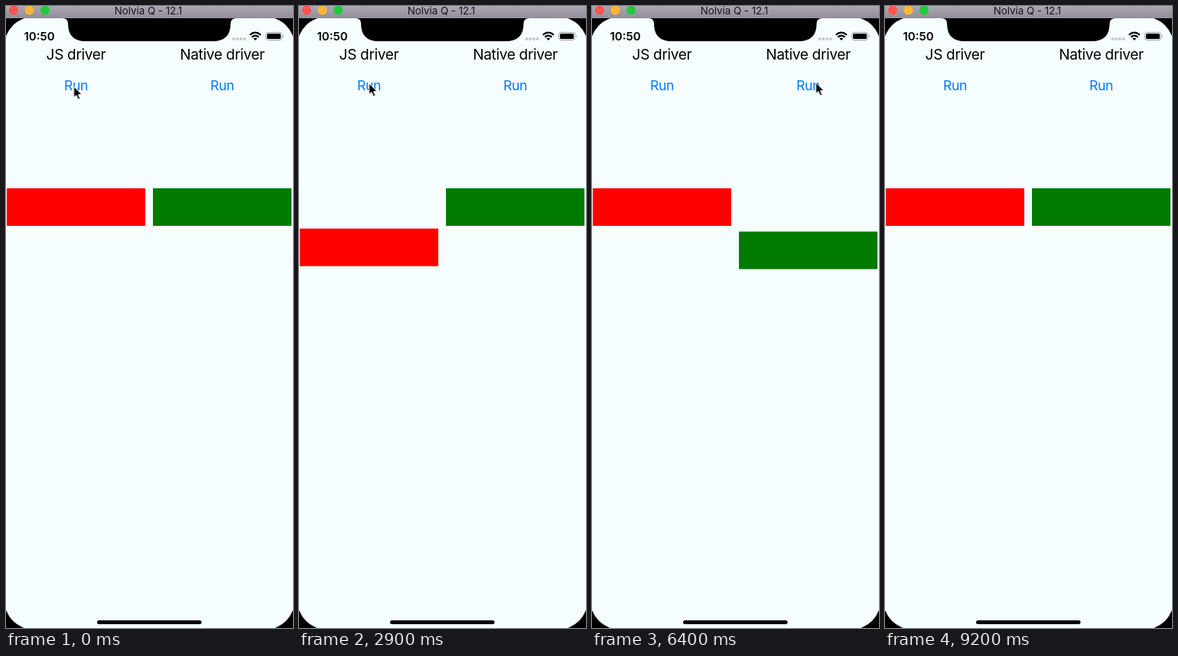
An HTML page without scripts that plays this animation: 375 px wide and 812 px high, repeating every 9.3 s.

```html
<!DOCTYPE html>
<html lang="en">
<head>
<meta charset="utf-8">
<title>Driver comparison</title>
<style>
  html, body { margin: 0; width: 100%; height: 100%; overflow: hidden; background: #000; }
  svg { display: block; width: 375px; height: 812px; }
  text { font-family: Inter, "Liberation Sans", sans-serif; text-anchor: middle; }
  .title { font-size: 13.3px; fill: #161616; }
  .clock { font-size: 15px; font-weight: 600; }
  .label { font-size: 19px; letter-spacing: -.3px; }
  .run { font-size: 17.6px; letter-spacing: -.3px; fill: #007aff; }

  /* "back" easing: t * t * (2.7 * t - 1.7) */
  .box { animation: 9.3s cubic-bezier(.3333, 0, .6667, -.5672) infinite; }
  .js { animation-name: js; }
  .native { animation-name: native; }
  .cursor { animation: cursor 9.3s ease-in-out infinite; }

  @keyframes js {
    0% { transform: translateY(0); }
    19.68% { transform: translateY(98px); }
    33.05%, 100% { transform: translateY(0); }
  }
  @keyframes native {
    0%, 47.66% { transform: translateY(0); }
    71.29% { transform: translateY(98px); }
    82.72%, 100% { transform: translateY(0); }
  }
  @keyframes cursor {
    0% { transform: translate(88.5px, 105px); }
    3%, 36% { transform: translate(91.5px, 101px); }
    45%, 85% { transform: translate(292.5px, 100px); }
    96%, 100% { transform: translate(400px, 190px); }
  }
</style>
</head>
<body>
<svg viewBox="0 0 375 812">
  <defs>
    <linearGradient id="bar" x2="0" y2="1">
      <stop stop-color="#aaa7b2"/>
      <stop offset="1" stop-color="#918e99"/>
    </linearGradient>
  </defs>

  <rect width="375" height="812"/>
  <rect x="-2" y="14" width="379" height="800" rx="38" fill="#f5fdff"/>
  <path d="M74 16Q81 16 81 23Q81 46 104 46H270Q293.500 46 293.500 23Q293.500 16 301 16Z"/>

  <rect width="375" height="16" fill="url(#bar)"/>
  <circle cx="10" cy="5.5" r="6" fill="#ff554f"/>
  <circle cx="30.5" cy="5.5" r="6" fill="#ffb632"/>
  <circle cx="51" cy="5.5" r="6" fill="#22c83c"/>
  <text class="title" x="186" y="11">Nolvia Q - 12.1</text>

  <text class="clock" x="43.500" y="45">10:50</text>
  <g fill="#c5c8cb">
    <circle cx="297.500" cy="43" r="2"/>
    <circle cx="302.200" cy="43" r="2"/>
    <circle cx="306.900" cy="43" r="2"/>
    <circle cx="311.600" cy="43" r="2"/>
  </g>
  <g fill="none" stroke="#000" stroke-width="2.200">
    <path d="M318.700 37.800Q325.800 31.500 332.900 37.800M321.300 40.600Q325.800 36.700 330.300 40.600"/>
    <path d="M323.300 42.300Q325.800 40.500 328.300 42.300L325.800 45Z" fill="#000" stroke="none"/>
  </g>
  <rect x="339.500" y="34.500" width="21" height="10" rx="2.800" fill="none" stroke="#9a9da0"/>
  <rect x="341" y="36" width="18" height="7" rx="1.500"/>
  <path d="M362 37.500Q363.800 39.500 362 41.500Z" fill="#9a9da0"/>

  <text class="label" x="91.500" y="70">JS driver</text>
  <text class="label" x="282.500" y="70">Native driver</text>
  <text class="run" x="91.500" y="109.500">Run</text>
  <text class="run" x="282.500" y="109.500">Run</text>

  <rect class="box js" x="1" y="238" width="181" height="49" fill="#f00"/>
  <rect class="box native" x="192" y="238" width="181" height="49" fill="#007b00"/>

  <rect x="119" y="802" width="136.500" height="5" rx="2.500"/>
  <path class="cursor" d="M0 0V14.500L3.300 11.500L5.800 17.200L8.300 16.100L5.900 10.600H10.500Z" stroke="#fff"/>
</svg>
</body>
</html>
```
